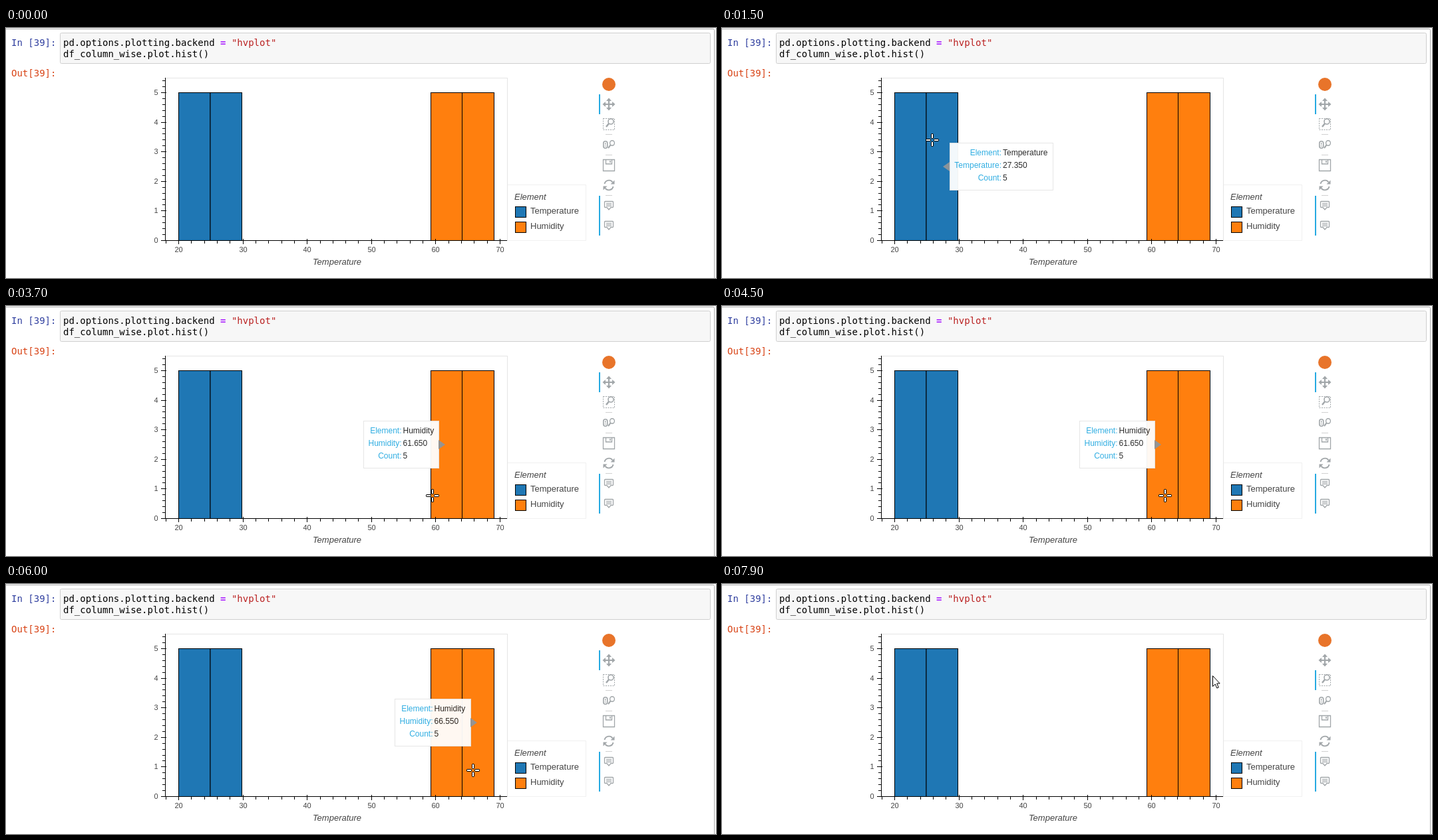
These frames come from a looping animation (1067 px wide and 377 px high, 8 s). An HTML page:

```html
<!DOCTYPE html>
<html lang="en">
<head>
<meta charset="utf-8">
<title>Histogram with hover tooltips</title>
<style>
  html, body { margin: 0; width: 100%; height: 100%; overflow: hidden; background: #fff; }
  svg { display: block; }
  text { font-family: "Liberation Sans", Arial, sans-serif; fill: #444; white-space: pre; }
  .code text { font: 14px "DejaVu Sans Mono", monospace; fill: #000; }
  .code .in { fill: #303f9f; }
  .code .out { fill: #d84315; }
  .op { fill: #a2f; font-weight: bold; }
  .str { fill: #ba2121; }
  .axes { font-size: 11px; }
  .axes path { stroke: #000; fill: none; }
  .label { font-size: 13px; }
  .title { font-size: 13px; font-style: italic; }
  .temp { fill: #1f77b4; stroke: #000; }
  .hum { fill: #ff7f0e; stroke: #000; }
  .icons { fill: none; stroke: #a1a6a9; stroke-width: 1.6; }
  .icons .solid { fill: #a1a6a9; stroke: none; }
  .icons .rule { stroke: #d0d0d0; stroke-width: 1; }
  .active { fill: #26aae1; }
  #tip { font-size: 12px; opacity: .95; }
  #tip .key { fill: #26aae1; text-anchor: end; }
  #tip .val { fill: #222; }
  .cursor { fill: #fff; stroke: #000; stroke-linejoin: round; }
</style>
</head>
<body>
<svg width="1067" height="377" viewBox="0 0 1067 377">
  <defs>
    <g id="note">
      <path d="M-5.5-6.5h11q1 0 1 1v7q0 1-1 1h-2.5l-3 3.5l-3-3.5h-2.5q-1 0-1-1v-7q0-1 1-1z" stroke-width="1.3"/>
      <path d="M-4-3.5h8M-4-1.5h8M-4 .5h8" stroke-width="1"/>
    </g>
    <g id="lens">
      <circle r="4"/>
      <path d="M-3 3l-4 5" stroke-width="2.4"/>
    </g>
    <rect id="arm" x="-1.5" y="-9.5" width="3" height="7" rx=".6"/>
  </defs>

  <rect x="-6" y="1.5" width="1070.5" height="390" rx="2" fill="none" stroke="#ababab"/>

  <g class="code">
    <rect x="81.5" y="7.5" width="977" height="46" rx="2" fill="#f7f7f7" stroke="#cfcfcf"/>
    <text class="in" x="8" y="27">In [39]:</text>
    <text class="out" x="8" y="73">Out[39]:</text>
    <text x="86" y="27">pd.options.plotting.backend <tspan class="op">=</tspan> <tspan class="str">"hvplot"</tspan></text>
    <text x="86" y="44">df_column_wise.plot.hist()</text>
  </g>

  <rect x="239.5" y="75.5" width="514" height="245" fill="none" stroke="#e5e5e5"/>
  <g id="bars"></g>
  <g id="axes" class="axes"><path d="M239.5 75V321M239 320.5H754"/></g>
  <text class="title" x="497.5" y="357" text-anchor="middle">Temperature</text>

  <rect x="753.5" y="236.5" width="118" height="84" fill="#fff" stroke="#f1f1f1"/>
  <path d="M753.5 236V321" stroke="#e5e5e5"/>
  <text class="title" x="764" y="259">Element</text>
  <rect class="temp" x="765.5" y="269.5" width="16" height="16"/>
  <text class="label" x="788" y="280">Temperature</text>
  <rect class="hum" x="765.5" y="292.5" width="16" height="16"/>
  <text class="label" x="788" y="303">Humidity</text>

  <circle cx="906" cy="85" r="10" fill="#e8742a"/>
  <rect id="tool" class="active" x="891" y="100" width="2" height="30"/>
  <rect class="active" x="891" y="253" width="2" height="60"/>
  <g class="icons">
    <path class="rule" d="M901 160.5h10M901 191.5h10M901 252.5h10"/>
    <g transform="translate(906 115)">
      <path d="M-7 0H7M0-7V7" stroke-width="2.2"/>
      <path class="solid" d="M0-9.5l4 4.5h-8zM0 9.5l4-4.5h-8zM-9.5 0l4.5-4v8zM9.5 0l-4.5-4v8z"/>
    </g>
    <rect x="897.5" y="136.5" width="17" height="17" stroke-width="1" stroke-dasharray="2 1.5"/>
    <use href="#lens" x="909" y="141"/>
    <rect x="897.8" y="170.8" width="6" height="10.4" rx="3"/>
    <path d="M900.8 173v3M899.5 178h2.6" stroke-width="1.2"/>
    <use href="#lens" transform="translate(911 173.5) scale(.85 .95)"/>
    <path d="M897.5 198.5h17v17h-17zM901.5 199v6h9v-6" stroke-width="1.3"/>
    <path d="M908 200v3" stroke-width="1.6"/>
    <path d="M899.5 235a6.7 6.7 0 0 1 12-2.5M912.5 239a6.7 6.7 0 0 1-12 2.5" stroke-width="1.9"/>
    <path class="solid" d="M914.5 229.5v6h-6zM897.5 244.5v-6h6z"/>
    <use href="#note" x="906" y="268"/>
    <use href="#note" x="906" y="298"/>
  </g>

  <g id="tip">
    <rect id="box" y="173.5" height="71" fill="#fff" stroke="#e5e5e5"/>
    <path id="beak" fill="#909599"/>
    <g id="rows">
      <text class="key" x="-2" y="192">Element:</text><text class="val" y="192"></text>
      <text class="key" x="-2" y="211"></text><text class="val" y="211"></text>
      <text class="key" x="-2" y="230">Count:</text><text class="val" y="230">5</text>
    </g>
  </g>

  <g id="beam" class="cursor">
    <path d="M-3.5-8.5h2.5l1 1l1-1h2.5v2h-2.5v13h2.5v2h-2.5l-1-1l-1 1h-2.5v-2h2.5v-13h-2.5z" stroke-width=".8"/>
  </g>
  <g id="cross" class="cursor">
    <use href="#arm"/>
    <use href="#arm" transform="rotate(90)"/>
    <use href="#arm" transform="rotate(180)"/>
    <use href="#arm" transform="rotate(270)"/>
  </g>
  <g id="arrow" class="cursor">
    <path d="M.5 .5V16.5L4.2 13L6.8 19L9.3 18L6.7 12H11.2z"/>
  </g>
  <g id="hand" class="cursor">
    <path d="M-1.5 9V1.8q0-1.3 1.5-1.3t1.5 1.3V6q2.5-.8 3 .7q2.500-.7 3 .7q3-.2 3 2v3.300q0 4-3 4h-6q-2 0-3-2l-3-4.500q-.6-1.500.8-2z"/>
  </g>
</svg>
<script>
const $ = id => document.getElementById(id);
const NS = "http://www.w3.org/2000/svg";
const LOOP = 8000, STEP = 100;

function add(parent, name, attrs, text = "") {
  const el = document.createElementNS(NS, name);
  for (const k in attrs) el.setAttribute(k, attrs[k]);
  el.textContent = text;
  parent.append(el);
}

// Bars, each with the place of its tooltip
const bars = [
  { name: "Temperature", mean: "22.450", x: 259.5, end: 307, box: 295, width: 155, value: 375 },
  { name: "Temperature", mean: "27.350", x: 307, end: 354.5, box: 342, width: 155, value: 422 },
  { name: "Humidity", mean: "61.650", x: 638.5, end: 685.5, box: 537, width: 113, value: 596.5 },
  { name: "Humidity", mean: "66.550", x: 685.5, end: 733.5, box: 584, width: 114, value: 643.5 }
];
for (const b of bars) {
  add($("bars"), "rect", {
    class: b.name === "Humidity" ? "hum" : "temp",
    x: b.x, y: 97.5, width: b.end - b.x, height: 223
  });
}

// Ticks and numbers
let ticks = "";
for (let i = 0; i <= 27; i++) {
  const y = Math.round(320 - i * 8.92) + .5;
  const major = i % 5 === 0;
  ticks += major ? `M233 ${y}h8` : `M235 ${y}h4`;
  if (major) add($("axes"), "text", { x: 228.5, y: y + 3.5, "text-anchor": "end" }, i / 5);
}
for (let v = 18; v <= 70; v += 2) {
  const x = Math.round(259 + (v - 20) * 9.66) + .5;
  const major = v % 10 === 0;
  ticks += major ? `M${x} 318v8` : `M${x} 321v4`;
  if (major) add($("axes"), "text", { x, y: 338, "text-anchor": "middle" }, v);
}
add($("axes"), "path", { d: ticks });

// Pointer path: time, x, y
const path = [
  [200, 92, 14], [500, 142, 44], [800, 230, 116], [1000, 262, 143], [1100, 262, 143],
  [1500, 316, 169], [1700, 327, 170], [1800, 327, 170],
  [2200, 286, 169], [2300, 286, 169], [2500, 325, 172], [2800, 381, 222],
  [3200, 444, 295], [3300, 466, 297], [3600, 616, 289], [3700, 641, 286],
  [4100, 701, 288], [4300, 701, 288], [4500, 666, 286], [4600, 656, 288], [4700, 656, 288],
  [5200, 713, 286], [5600, 662, 284], [5700, 662, 284], [6000, 702, 281], [6200, 708, 282],
  [6500, 698, 284], [6600, 698, 284], [6900, 752, 243], [7300, 880, 168],
  [7400, 905, 151], [7500, 904, 153], [7700, 904, 147], [7800, 904, 147]
];

function pointer(t) {
  const i = path.findIndex(p => p[0] > t);
  if (i < 0) return path[path.length - 1].slice(1);
  const [t0, x0, y0] = path[i - 1], [t1, x1, y1] = path[i];
  const k = (t - t0) / (t1 - t0);
  return [x0 + (x1 - x0) * k, y0 + (y1 - y0) * k].map(Math.round);
}

function kindAt(x, y) {
  if (y < 54) return "beam";
  if (x > 240 && x < 753 && y > 75 && y < 320) return "cross";
  return x > 891 ? "hand" : "arrow";
}

function showTip(bar) {
  $("tip").style.display = bar ? "" : "none";
  if (!bar) return;
  const right = bar.box + bar.width;
  $("box").setAttribute("x", bar.box + .5);
  $("box").setAttribute("width", bar.width);
  $("beak").setAttribute("d", bar.name === "Humidity"
    ? `M${right} 202v14l10-7z` : `M${bar.box} 202v14l-10-7z`);
  $("rows").setAttribute("transform", `translate(${bar.value} 0)`);
  const cells = $("rows").children;
  cells[1].textContent = bar.name;
  cells[2].textContent = bar.name + ":";
  cells[3].textContent = bar.mean;
}

function draw(t) {
  const clicked = t >= 7900;
  const [x, y] = t < 200 ? [0, 0] : clicked ? [737, 138] : pointer(t);
  const kind = t < 200 ? "" : clicked ? "arrow" : kindAt(x, y);
  for (const id of ["beam", "cross", "arrow", "hand"]) {
    $(id).style.display = id === kind ? "" : "none";
    $(id).setAttribute("transform", `translate(${x} ${y})`);
  }
  showTip(kind === "cross" && y > 97 && bars.find(b => x > b.x && x < b.end));
  $("tool").setAttribute("y", clicked ? 130 : 100);
}

let last = -1;
function tick() {
  const t = Math.floor(performance.now() % LOOP / STEP) * STEP;
  if (t !== last) draw(last = t);
  requestAnimationFrame(tick);
}
tick();
</script>
</body>
</html>
```
